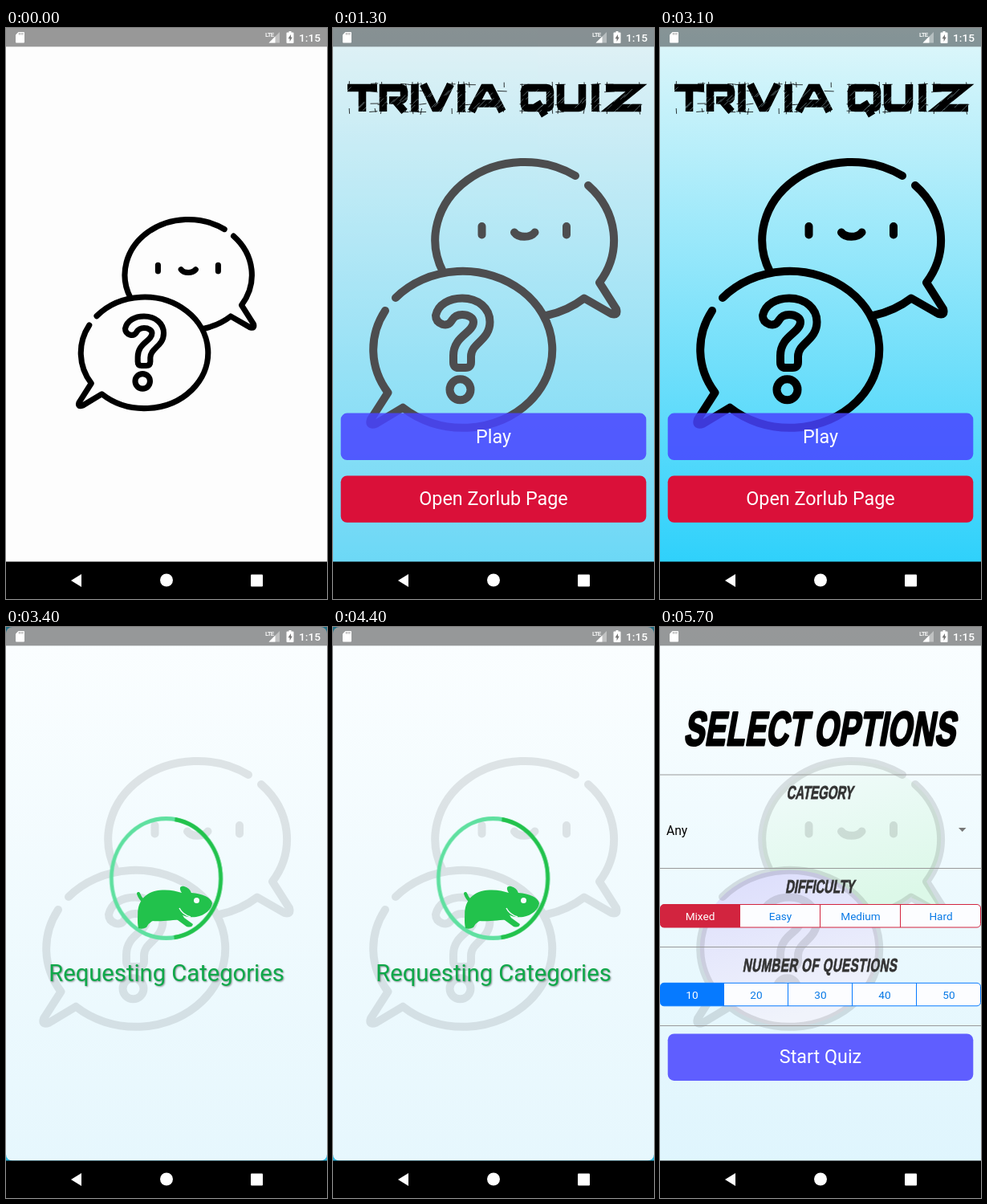
Recreate the animation shown at these times as an HTML page. Size 400x711 px, loop 8000 ms.

```html
<!DOCTYPE html>
<html lang="en">
<head>
<meta charset="utf-8">
<title>Trivia Quiz</title>
<style>
  html, body { margin: 0; width: 100%; height: 100%; overflow: hidden; background: #000; }
  svg { display: block; width: 100vw; height: 100vh; }
  text { font-family: Roboto, sans-serif; }
  .mid { text-anchor: middle; }
  .btn { font-size: 23.35px; fill: #fff; text-anchor: middle; }
  .seg { font-size: 13.6px; text-anchor: middle; fill: #0a7ae6; }
  .seg .on { fill: #fff; }
  .comic { font: bold 23px "Liberation Sans", Arial, sans-serif; text-anchor: middle; fill: #333; stroke: #333; stroke-width: .8; }
  .comic.big { font-size: 59px; fill: #000; stroke: #000; stroke-width: 3; stroke-linejoin: round; letter-spacing: .8px; word-spacing: -5px; }
  .line { fill: none; stroke: #000; stroke-linecap: round; stroke-linejoin: round; }

  .splash { animation: splash 8s step-end infinite; }
  .backdrop { animation: backdrop 8s steps(3) infinite; }
  .loader { animation: loader 8s steps(2) infinite; }
  .options { animation: options 8s step-end infinite; }
  .wheel { animation: spin 1s -.6s steps(7) infinite; }
  .body { animation: bob 1s -.6s infinite; }
  .hind { transform-origin: 180px 360px; animation: hind 1s -.6s infinite; }
  .fore { transform-origin: 213px 358px; animation: fore 1s -.6s infinite; }

  @keyframes splash { 0% { opacity: 1 } 13.75%, 100% { opacity: 0 } }
  @keyframes backdrop { 0%, 13.75% { opacity: 0 } 17.5%, 100% { opacity: 1 } }
  @keyframes loader { 0%, 40% { opacity: 0 } 42.5%, 100% { opacity: 1 } }
  @keyframes options {
    0% { opacity: 0; transform: translateY(50px) }
    66.25% { opacity: .1; transform: translateY(38px) }
    67.5% { opacity: .35; transform: translateY(20px) }
    68.75% { opacity: .7; transform: translateY(8px) }
    70% { opacity: .92; transform: translateY(2px) }
    71.25%, 100% { opacity: 1; transform: none }
  }
  @keyframes spin { 0% { transform: rotate(0deg) } 70%, 100% { transform: rotate(360deg) } }
  @keyframes bob { 0%, 35%, 70%, 100% { transform: none } 17%, 52% { transform: translateY(-2px) rotate(.4deg) } }
  @keyframes hind { 0%, 35%, 70%, 100% { transform: none } 17%, 52% { transform: rotate(-28deg) } }
  @keyframes fore { 0%, 35%, 70%, 100% { transform: none } 17%, 52% { transform: rotate(40deg) } }
</style>
</head>
<body>
<svg viewBox="0 0 400 711" preserveAspectRatio="none">
  <defs>
    <linearGradient id="sky" x1="0" y1="0" x2="0" y2="1">
      <stop stop-color="#e0f7fa"/><stop offset="1" stop-color="#2fd1fb"/>
    </linearGradient>
    <linearGradient id="pale" x1="0" y1="0" x2="0" y2="1">
      <stop stop-color="#fbfeff"/><stop offset="1" stop-color="#e6f7fd"/>
    </linearGradient>
    <linearGradient id="ice" x1="0" y1="0" x2="0" y2="1">
      <stop stop-color="#fafeff"/><stop offset="1" stop-color="#dff5fd"/>
    </linearGradient>
    <linearGradient id="mint" x1="0" y1="0" x2=".3" y2="1">
      <stop stop-color="#f3fbfd"/><stop offset="1" stop-color="#dcf8e8"/>
    </linearGradient>
    <linearGradient id="lilac" x1="0" y1="0" x2=".3" y2="1">
      <stop stop-color="#dbdcfc"/><stop offset="1" stop-color="#f0f3fb"/>
    </linearGradient>

    <g id="chat" class="line" stroke-width="10">
      <path d="M302 184A111.5 97 0 0 0 137 303.5"/>
      <path d="M318 196A111.5 97 0 0 1 332 317L353 350Q355.5 358.5 347 356L313 336.5A111.5 97 0 0 1 266 358"/>
      <path d="M185.5 247V257.5M291 247V257.5M226 254.5C231 261.5 246 261.5 251.5 254.5"/>
      <path d="M78 336A111.5 97.5 0 1 1 87 472.7L54 492.5Q44 496.5 47 487.500L68.5 454A111.5 97.5 0 0 1 65 352"/>
      <path d="M128 358C131 344 145 336.5 161 336.5C181 336.500 195.500 349 195.500 366C195.500 389 172 392 172 409V416Q172 423 165 423H156.500Q150 423 150 416V408C150 383 175 380 175 366C175 361 169 357 161 357C151 357 149 363 147.500 365Q143.500 371 136.500 369Q128 366 128 358Z"/>
      <circle cx="158.500" cy="450.300" r="13"/>
    </g>

    <path id="word" fill="none" stroke-width="9.500" d="M18 74.500H55M36.500 74V104
      M62.500 104V74.500H84Q88.500 74.500 88.500 79V85Q88.500 90 84 90H70M77 90L89 104
      M102 70V104 M112.500 70L127 99.500H132L146.500 70 M160 70V104
      M172.500 104L188 74.500H196L211 104M181 94H203
      M238.500 79Q238.500 74.500 243 74.500H266Q270.500 74.500 270.500 79V95Q270.500 99.500 266 99.500H243Q238.500 99.500 238.500 95ZM254 92L264 109
      M283.500 70V95Q283.500 99.500 288 99.500H306Q310.500 99.500 310.500 95V70
      M327 70V104 M340 74.500H378L347 99.500H384"/>
    <mask id="sketch" maskUnits="userSpaceOnUse" x="0" y="55" width="400" height="65">
      <rect y="55" width="400" height="65" fill="#fff"/>
      <path id="hatch" stroke="#000" stroke-width=".7" opacity=".6"/>
    </mask>
  </defs>

  <g>
    <rect width="400" height="711" fill="#e6e8ed"/>
    <g class="backdrop">
      <rect width="400" height="665" fill="url(#sky)"/>
      <use href="#chat"/>
    </g>
    <g role="img" aria-label="TRIVIA QUIZ" stroke="#000">
      <use href="#word" mask="url(#sketch)"/>
      <path id="scratch" fill="none" stroke-width=".8"/>
    </g>
    <rect x="9.700" y="479.600" width="380.600" height="58.400" rx="7.800" fill="#4844ff" fill-opacity=".85"/>
    <rect x="9.700" y="557.400" width="380.600" height="58.400" rx="7.800" fill="#da1039"/>
    <text class="btn" x="200" y="516.500">Play</text>
    <text class="btn" x="200" y="594">Open Zorlub Page</text>
  </g>

  <g class="loader">
    <rect width="400" height="665" fill="#2fb9e0"/>
    <rect width="400" height="664.500" rx="8" fill="url(#pale)"/>
    <use href="#chat" opacity=".095"/>
    <g transform="translate(199.500 313) scale(1 1.092)">
      <g class="wheel" fill="none" stroke-width="4.800">
        <circle r="68.100" stroke="#5fe0a0"/>
        <path d="M11 -67.200A68.100 68.100 0 0 1 10 67.400" stroke="#22c24c"/>
      </g>
    </g>
    <g class="body" fill="#22c24c">
      <path d="M165 332Q167 338 172 342" fill="none" stroke="#22c24c" stroke-width="4" stroke-linecap="round"/>
      <path class="hind" d="M166 352C163 362 164 370 165 375Q170 377 175 374Q180 364 192 364L190 345Z"/>
      <path class="fore" d="M204 358L214 365L225 373Q232 375 233 370L222 362L216 352Z"/>
      <path d="M165 365C161 345 172 328 195 327.500C205 327 212 329 219 331C215 325 217 322 222 323Q229 325 231 331C245 332 256 337 257 344C256 352 248 359 237 361C227 362 220 360 216 356Q218 361 222 364C205 365 195 367 182 366Z"/>
      <path d="M216 350Q220 358 230 361" fill="none" stroke="#f3fbfd" stroke-width="1.500"/>
      <circle cx="237.500" cy="340.500" r="3.500" fill="#f6fcfd"/>
    </g>
    <text class="mid" x="200" y="441" font-size="29.200" fill="#0fa84a" style="text-shadow:1px 1px 2px #0006">Requesting Categories</text>
  </g>

  <g class="options">
    <rect width="400" height="665" fill="url(#ice)"/>
    <ellipse cx="238.700" cy="264" rx="111.500" ry="97" fill="url(#mint)"/>
    <path d="M332 317L353 354L313 337Z" fill="#dcf8e8"/>
    <ellipse cx="161.200" cy="400" rx="111.500" ry="97.500" fill="url(#lilac)"/>
    <use href="#chat" opacity=".11"/>
    <path d="M0 184H400M0 300.500H400M0 398.500H400M0 496.500H400" stroke="#999"/>
    <text class="comic big" transform="translate(198.500 147) skewX(-10) scale(.65 1)">SELECT OPTIONS</text>
    <text class="comic" transform="translate(199 214) skewX(-10) scale(.65 1)">CATEGORY</text>
    <text class="comic" transform="translate(199 331) skewX(-10) scale(.65 1)">DIFFICULTY</text>
    <text class="comic" transform="translate(199 428.500) skewX(-10) scale(.65 1)" letter-spacing=".8">NUMBER OF QUESTIONS</text>
    <text x="8" y="258.500" font-size="15.600">Any</text>
    <path d="M372 250H381.500L376.750 255Z" fill="#777"/>
    <g id="level" class="seg"></g>
    <g id="count" class="seg"></g>
    <rect x="9.700" y="506.500" width="380.600" height="58.400" rx="7.800" fill="#4844ff" fill-opacity=".85"/>
    <text class="btn" x="200" y="543">Start Quiz</text>
  </g>

  <g class="splash">
    <rect width="400" height="711" fill="#fdfdfd"/>
    <use href="#chat" transform="translate(57.570 119.830) scale(.7107)"/>
  </g>

  <rect width="400" height="23.300" opacity=".4"/>
  <g fill="#fff">
    <path d="M15.500 5H22Q23 5 23 6V17.500Q23 18.500 22 18.500H13Q12 18.500 12 17.500V8.500Z"/>
    <path d="M16.500 6V8.500M18.700 6V8.500M20.900 6V8.500" stroke="#979797"/>
    <text x="323" y="11" font-size="8" font-weight="500" letter-spacing="-.8">LTE</text>
    <path d="M341 5V18.500H327.500Z" opacity=".4"/>
    <path d="M335.500 10.500V18.500H327.500Z"/>
    <path d="M352.500 4H355.500V5.500H357.500Q358.500 5.500 358.500 6.500V18Q358.500 19 357.500 19H350.500Q349.500 19 349.500 18V6.500Q349.500 5.500 350.500 5.500H352.500Z"/>
    <path d="M355 8L351.500 13.200H353.600V17L356.800 11.600H355Z" fill="#777"/>
    <text x="392" y="17" font-size="13.700" font-weight="500" text-anchor="end">1:15</text>
  </g>
  <rect y="664.500" width="400" height="47"/>
  <g fill="#fff">
    <path d="M81 688L94 680V696Z"/>
    <circle cx="200" cy="687.500" r="8"/>
    <rect x="305" y="680.500" width="15" height="15" rx="1"/>
  </g>
</svg>
<script>
  const $ = id => document.getElementById(id);

  let seed = 7;
  const rnd = (lo, hi) => {
    seed = seed * 16807 % 2147483647;
    return lo + (hi - lo) * seed / 2147483647;
  };
  const line = (x, y, u, v) => `M${x.toFixed(1)} ${y.toFixed(1)}L${u.toFixed(1)} ${v.toFixed(1)}`;

  // Pencil look of the title: diagonal gaps inside, overshooting guides outside.
  let hatch = '', scratch = '';
  for (let x = 12; x < 390; x += rnd(2, 5)) {
    const y = rnd(84, 108), n = rnd(5, 11);
    hatch += line(x, y, x + n, y - n);
  }
  const letters = [[18, 55], [58, 93], [97, 107], [108, 151], [155, 165],
                   [168, 215], [234, 275], [279, 315], [322, 332], [340, 384]];
  for (const [a, b] of letters) {
    for (const y of [70, 79, 95, 104]) {
      const x = rnd(0, 1) < .5 ? a : b - 8;
      scratch += line(x - rnd(0, 3), y + rnd(-1, 1), x + 8 + rnd(0, 3), y + rnd(-1, 1));
    }
    for (const x of [a + 2, b - 2]) {
      scratch += line(x + rnd(-1, 1), 72 - rnd(2, 6), x + rnd(-1, 1), 74);
      scratch += line(x + rnd(-1, 1), 100, x + rnd(-1, 1), 103 + rnd(1, 5));
    }
  }
  $('hatch').setAttribute('d', hatch);
  $('scratch').setAttribute('d', scratch);

  const segments = (id, y, color, labels) => {
    const w = 400 / labels.length, h = 28.5;
    let out = `<rect x=".5" y="${y}" width="399" height="${h}" rx="4.5" fill="#fcfdff" stroke="${color}"/>` +
      `<path d="M${w} ${y}H5Q.5 ${y} .5 ${y + 4.5}V${y + h - 4.5}Q.5 ${y + h} 5 ${y + h}H${w}Z" fill="${color}"/>`;
    labels.forEach((label, i) => {
      if (i) out += `<path d="M${i * w - .5} ${y}v${h}" stroke="${color}"/>`;
      out += `<text x="${(i + .5) * w}" y="${y + 19.3}" class="${i ? '' : 'on'}">${label}</text>`;
    });
    $(id).innerHTML = out;
  };
  segments('level', 345.5, '#d2243f', ['Mixed', 'Easy', 'Medium', 'Hard']);
  segments('count', 443.3, '#067aff', [10, 20, 30, 40, 50]);
</script>
</body>
</html>
```
